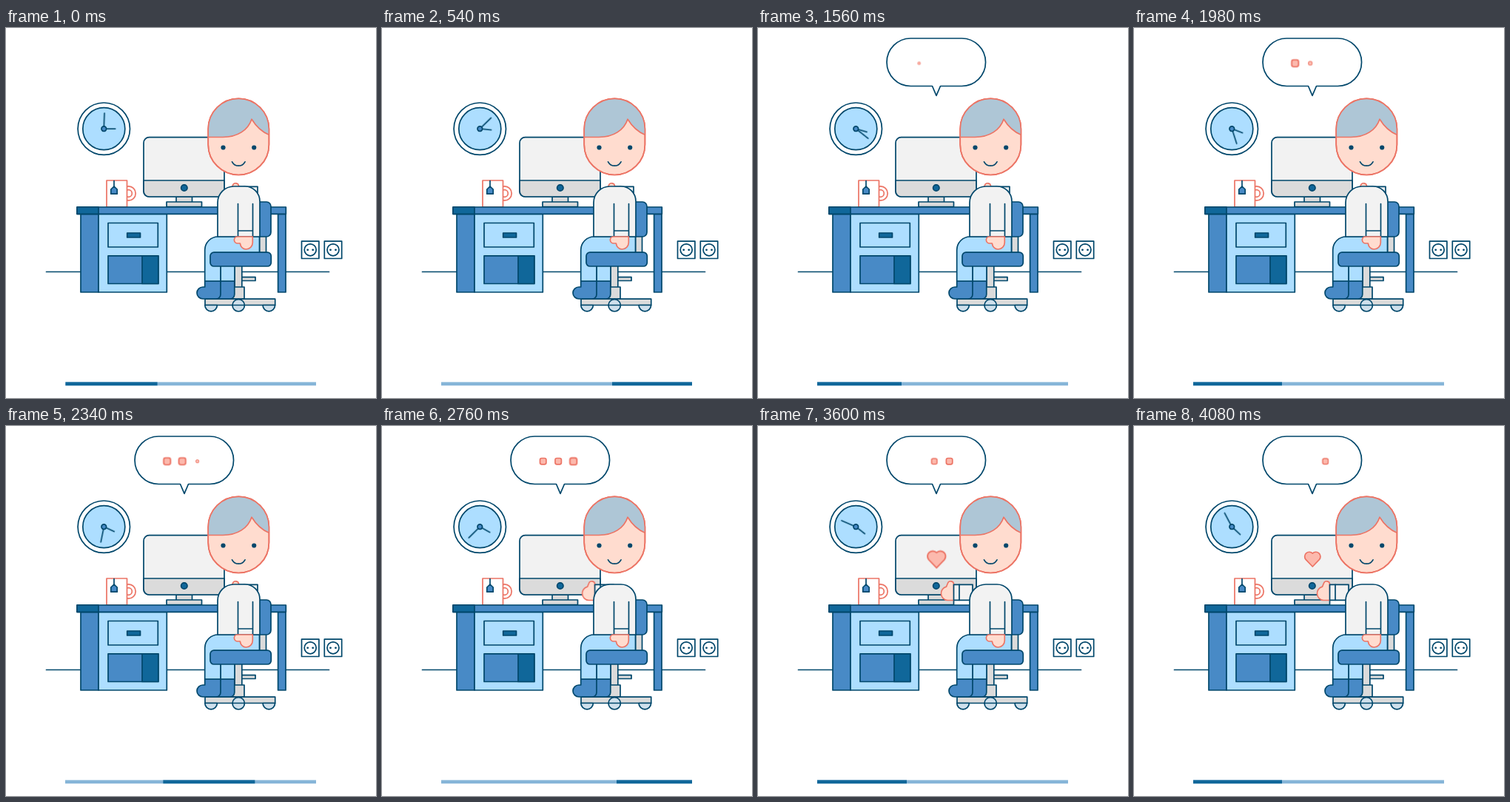
Animation, 500 px wide and 500 px high, one loop 4.14 s. Source, as an HTML page:

```html
<!DOCTYPE html>
<html lang="en">
<head>
<meta charset="utf-8">
<title>Desk chat</title>
<style>
  html, body { margin: 0; width: 100%; height: 100%; overflow: hidden; background: #fff; }
  svg { display: block; width: 100%; height: 100%; }
  svg { --navy: #00476b; --deep: #10679a; --blue: #488ac6; --sky: #addeff;
        --grey: #dbdbdb; --pale: #f2f2f2; --coral: #ec7465; --skin: #ffdccf; --pink: #fcb9ad; }
  .ink { stroke: var(--navy); stroke-width: 1.7; stroke-linejoin: round; stroke-linecap: round; fill: none; }
  .red { stroke: var(--coral); stroke-width: 1.7; stroke-linejoin: round; fill: var(--skin); }
  .ink .deep, .deep { fill: var(--deep); }
  .ink .blue { fill: var(--blue); }
  .ink .sky { fill: var(--sky); }
  .ink .grey { fill: var(--grey); }
  .ink .pale { fill: var(--pale); }
  .ink .white { fill: #fff; }
  .ink .plate { fill: #cfe0ec; }
  .dot { fill: var(--navy); stroke: none; }
  .pink { fill: var(--pink); }

  .anim { animation: 4140ms linear infinite; }
  #minute { transform-origin: 132.3px 136.2px; animation-name: minute; }
  #hour { transform-origin: 132.3px 136.2px; animation-name: hour; }
  #bubble { transform-origin: 241px 91px; animation-name: bubble; }
  #heart { transform-origin: 241.3px 179px; animation-name: heart; }
  #reach { animation-name: reach; }
  #slider { animation-name: slide; }
  #dots rect { transform-box: fill-box; transform-origin: center; }
  #dot1 { animation-name: dot1; }
  #dot2 { animation-name: dot2; }
  #dot3 { animation-name: dot3; }

  @keyframes minute { from { transform: rotate(2deg); } to { transform: rotate(337deg); } }
  @keyframes hour { from { transform: rotate(90deg); } to { transform: rotate(134deg); } }
  @keyframes bubble {
    0%, 15% { transform: scale(0); animation-timing-function: ease-out; }
    26%, 100% { transform: scale(1); }
  }
  @keyframes reach {
    0%, 62% { transform: translateX(50px); animation-timing-function: ease-in-out; }
    71%, 100% { transform: none; }
  }
  @keyframes heart {
    0%, 81% { transform: scale(0); animation-timing-function: ease-out; }
    87% { transform: scale(1.15); }
    91%, 100% { transform: scale(1); }
  }
  @keyframes dot1 {
    0%, 35.5% { transform: scale(0); }
    37.7% { transform: scale(.4); }
    41.5% { transform: scale(1.5); }
    47%, 58% { transform: scale(1.1); }
    62%, 78% { transform: scale(1); }
    85%, 100% { transform: scale(0); }
  }
  @keyframes dot2 {
    0%, 45% { transform: scale(0); }
    47.2% { transform: scale(.4); }
    51% { transform: scale(1.5); }
    56.5% { transform: scale(1.1); }
    62%, 86% { transform: scale(1); }
    94%, 100% { transform: scale(0); }
  }
  @keyframes dot3 {
    0%, 54.5% { transform: scale(0); }
    56.5% { transform: scale(.46); }
    60.5% { transform: scale(1.5); }
    67% { transform: scale(1.1); }
    72%, 97.5% { transform: scale(1); }
    98.55% { transform: scale(.88); }
    100% { transform: scale(.7); }
  }
  @keyframes slide {
    0% { transform: translateX(0); }
    5.8%, 56.52% { transform: translateX(132px); }
    13.04%, 63.77% { transform: translateX(231px); }
    16.33%, 67.05% { transform: translateX(238px); }
    19.6%, 70.34% { transform: translateX(231px); }
    26.09%, 76.81% { transform: translateX(148px); }
    27.54%, 78.26% { transform: translateX(118px); }
    32.66%, 83.4% { transform: translateX(15px); }
    37.68%, 88.4% { transform: translateX(-10px); }
    41.7%, 92.4% { transform: translateX(-14px); }
    47.8%, 98.55% { transform: translateX(-4px); }
    50.72% { transform: translateX(1px); }
    100% { transform: translateX(0); }
  }
</style>
</head>
<body>
<svg viewBox="0 0 500 500">
  <defs>
    <clipPath id="track"><rect x="80.5" y="478" width="338" height="6"/></clipPath>
    <clipPath id="face"><rect x="273.2" y="95.3" width="82.2" height="103.2" rx="41.1"/></clipPath>
    <g id="socket">
      <rect class="white" x="-11.7" y="-11.7" width="23.4" height="23.4"/>
      <circle class="plate" r="8"/>
      <circle class="dot" cx="-3.5" r="1.4"/>
      <circle class="dot" cx="3.5" r="1.4"/>
    </g>
  </defs>

  <g class="ink">
    <path d="M54.500 329.500H436.500"/>
    <use href="#socket" x="411.200" y="299.800"/>
    <use href="#socket" x="442" y="299.800"/>
  </g>

  <!-- clock -->
  <g class="ink">
    <circle class="white" cx="132.300" cy="136.200" r="35.200"/>
    <circle class="sky" cx="132.300" cy="136.200" r="28.500"/>
    <path id="minute" class="anim" d="M132.300 136.200V115"/>
    <path id="hour" class="anim" d="M132.300 136.200V120.800"/>
    <circle class="blue" cx="132.300" cy="136.200" r="3.300"/>
  </g>

  <!-- monitor -->
  <g class="ink">
    <path class="grey" d="M230 228h21.500v7H230zM217 235h47.500v6.500H217z"/>
    <rect class="pale" x="186" y="147.700" width="109" height="80.300" rx="7.500"/>
    <path class="grey" d="M186 206H295V220.500a7.500 7.500 0 0 1-7.500 7.500H193.500a7.500 7.500 0 0 1-7.500-7.500z"/>
    <circle class="deep" cx="240.800" cy="216" r="4.200"/>
  </g>
  <path id="heart" class="red pink anim" d="M241.300 190l-9.200-9.600a6.200 6.200 0 0 1 9.200-8.300a6.200 6.200 0 0 1 9.200 8.300z"/>

  <!-- mug -->
  <g class="red" style="fill:#fff">
    <circle cx="165.500" cy="223.500" r="9.700"/>
    <circle cx="165.500" cy="223.500" r="4.800"/>
    <path d="M136 206H163.500V242H136z"/>
  </g>
  <g class="ink">
    <path d="M146 206.500V214"/>
    <path class="blue" d="M141.800 224.200V218l4.200-4 4.200 4v6.200z"/>
  </g>

  <!-- desk -->
  <g class="ink">
    <path class="blue" d="M101 251.300h24V357h-24zM367.600 251.300H378V357H367.600z"/>
    <path class="sky" d="M125 251.300h92.300V357H125z"/>
    <path class="blue" d="M96 242H378.300v9.300H96z"/>
    <path class="deep" d="M96 242h29v9.300H96z"/>
    <path d="M138 263.500h67.300V296H138z"/>
    <path class="deep" d="M163.700 277h17.800v6h-17.800z"/>
    <path class="blue" d="M138 307.800h67.800v37.700H138z"/>
    <path class="deep" d="M184 307.800h21.800v37.700H184z"/>
  </g>

  <!-- chair -->
  <g class="ink">
    <path class="grey" d="M342.500 280h9v24h-9zM309 320h9.800v30H309zM318.800 336.700H337v4.800H318.800zM306 350h16v16.300H306z"/>
    <path class="blue" d="M336 235H352a6 6 0 0 1 6 6V276a6 6 0 0 1-6 6H336z"/>
    <path class="grey" d="M269 366.200h94.700v8.300H269z"/>
    <path class="plate" d="M268.800 374.500h16.600a8.300 8.300 0 0 1-16.600 0zM347 374.500h16.600a8.300 8.300 0 0 1-16.600 0z"/>
    <circle class="plate" cx="314.200" cy="374.800" r="8.200"/>
    <path d="M306 374.500h16.400"/>
  </g>

  <!-- legs -->
  <g class="ink">
    <path class="blue" d="M290 342h18.800V360a6 6 0 0 1-6 6H284z"/>
    <path class="sky" d="M290 320h19v22h-19z"/>
    <path class="blue" d="M268.700 342H290V360a6 6 0 0 1-6 6H266a8 8 0 0 1 0-16h2.700z"/>
    <path class="sky" d="M268.700 342V300a18 18 0 0 1 18-18H342.500V304H290V342z"/>
    <rect class="blue" x="276" y="303.200" width="82.300" height="18.800" rx="5"/>
  </g>

  <!-- outstretched arm, hidden behind the torso at first -->
  <g id="reach" class="anim">
    <path class="red" d="M265 235.500H256a9.300 9.300 0 0 1-1.500-18.300l1.800-4.500a4.200 4.200 0 0 1 8.200 1.300z"/>
    <g class="ink">
      <path class="pale" d="M264.500 214.300H290V235.300H264.500z"/>
      <path d="M272 214.300V235.300"/>
    </g>
  </g>

  <!-- torso -->
  <g class="ink">
    <path class="pale" d="M286 282V236a22 22 0 0 1 22-22H323a20 20 0 0 1 20 20V282z"/>
    <path d="M313.500 237.500V282M333.500 237.500V282M313.500 274h20"/>
  </g>
  <path class="red" d="M312.500 282H333.300V290a9 9 0 0 1-9 9c-4.300 0-7.300-3.500-8-8h-3a4.500 4.500 0 0 1-.8-9z"/>

  <!-- head -->
  <rect class="red" x="273.200" y="95.300" width="82.200" height="103.200" rx="41.100"/>
  <g clip-path="url(#face)">
    <path class="red" style="fill:#aec6d6" d="M270 147.500H293C313 147.500 327 138 332 123.200C338 133 346 141 358 145.500V90H270z"/>
  </g>
  <rect class="red" style="fill:none" x="273.200" y="95.300" width="82.200" height="103.200" rx="41.100"/>
  <circle class="dot" cx="293.500" cy="161.500" r="3.100"/>
  <circle class="dot" cx="335.200" cy="161.500" r="3.100"/>
  <path class="ink" d="M305.500 180.800C309.500 188 319 188 323 180.800"/>

  <!-- speech bubble -->
  <g id="bubble" class="ink anim">
    <path class="white" d="M206.300 14H275.300a32.200 32.200 0 0 1 0 64.500H246.500L241 91.300L235.500 78.500H206.300a32.200 32.200 0 0 1 0-64.500z"/>
  </g>
  <g id="dots" class="red pink">
    <rect id="dot1" class="anim" x="213.500" y="43.500" width="8.400" height="8.400" rx="2.300"/>
    <rect id="dot2" class="anim" x="234" y="43.500" width="8.400" height="8.400" rx="2.300"/>
    <rect id="dot3" class="anim" x="254.400" y="43.500" width="8.400" height="8.400" rx="2.300"/>
  </g>

  <!-- progress bar -->
  <rect x="80" y="478.500" width="339" height="4.700" fill="#86b5d8"/>
  <g clip-path="url(#track)">
    <rect id="slider" class="deep anim" x="80" y="478.500" width="124" height="4.700"/>
  </g>
</svg>
</body>
</html>
```
